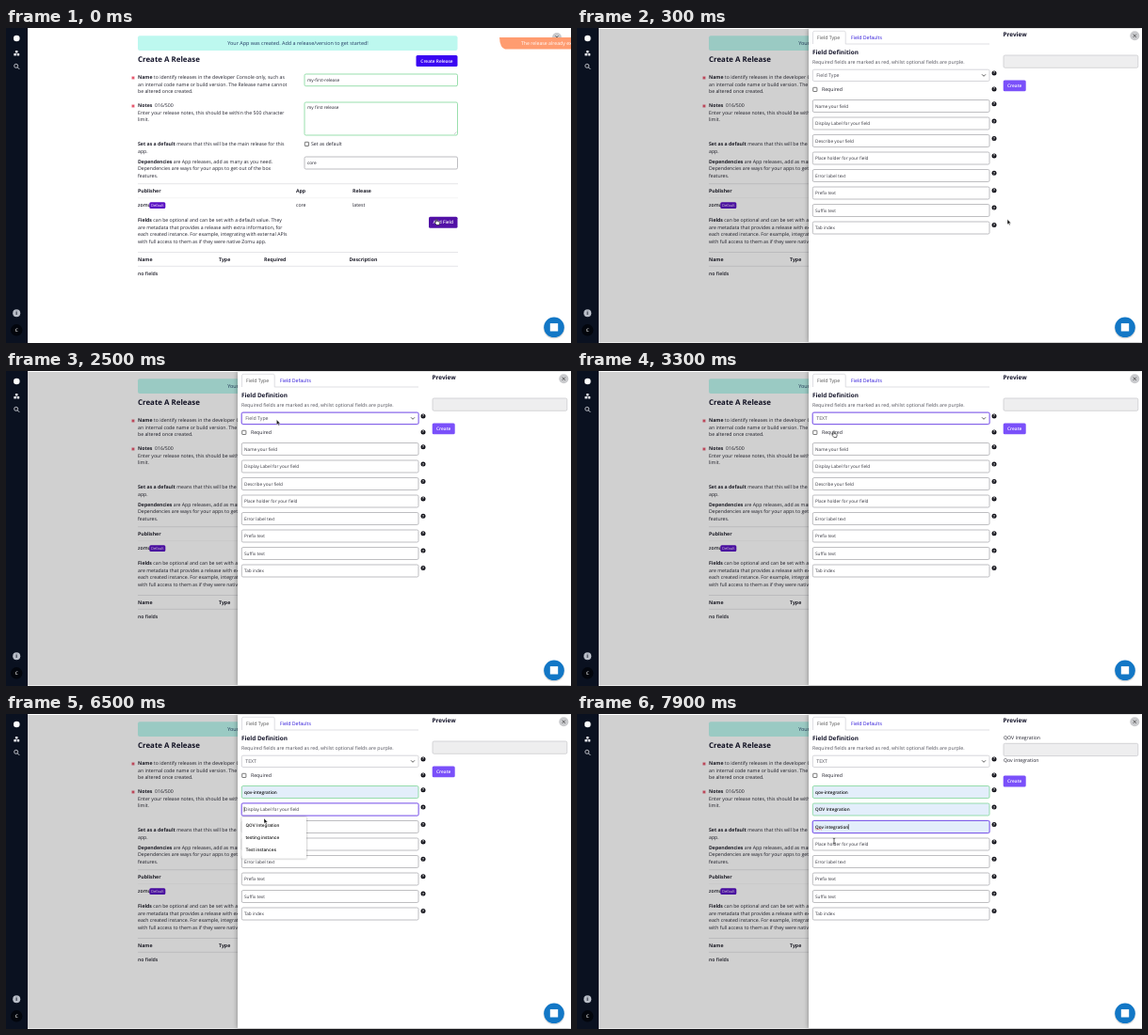
Write an HTML page that moves like this. It is 600x335 px and loops after 8 s.

```html
<!DOCTYPE html>
<html lang="en">
<head>
<meta charset="utf-8">
<title>Create a release</title>
<style>
html, body { margin: 0; width: 100%; height: 100%; overflow: hidden; background: #fff; }
svg { display: block; width: 600px; height: 335px; }
text { font-family: "Open Sans", "Noto Sans", sans-serif; text-rendering: geometricPrecision; white-space: pre; }
.b { font-weight: 700; }
.s { font-weight: 600; }
.menu { font-family: Inter, "Liberation Sans", sans-serif; font-weight: 500; }
</style>
</head>
<body>
<svg id="stage" viewBox="0 0 600 335">
  <g id="page"></g>
  <g id="live"></g>
  <g id="chrome"></g>
</svg>
<script>
const LOOP = 8000, STEP = 100;
const INK = '#20202c', PURPLE = '#5a2be2', GREEN = '#6fd28a', GREY = '#a2a2a6';
const $ = id => document.getElementById(id);

// y is the middle of the capitals
const text = (x, y, s, size = 5.2, fill = INK, cls = '', anchor = 'start') =>
  `<text x="${x}" y="${y + size * .355}" font-size="${size}" fill="${fill}" class="${cls}" text-anchor="${anchor}">${s}</text>`;
const bold = s => `<tspan class="b">${s}</tspan>`;
const lines = (x, y, rows) => rows.map((s, i) => text(x, y + i * 7.5, s)).join('');
const rect = (x, y, w, h, fill, stroke = 'none', r = 1.5, sw = .7) =>
  `<rect x="${x}" y="${y}" width="${w}" height="${h}" rx="${r}" fill="${fill}" stroke="${stroke}" stroke-width="${sw}"/>`;
const circle = (x, y, r, fill) => `<circle cx="${x}" cy="${y}" r="${r}" fill="${fill}"/>`;
const path = (d, stroke, sw = .6, fill = 'none') =>
  `<path d="${d}" fill="${fill}" stroke="${stroke}" stroke-width="${sw}"/>`;
const rule = (y, c = '#d4d4d8') => path(`M140 ${y}H480`, c, .6);
const button = (x, y, w, s, fill, h = 12) =>
  rect(x, y, w, h, fill) + text(x + w / 2, y + h / 2, s, 4.8, '#fff', 's', 'middle');
const star = (x, y) => path(`M${x} ${y - 1.8}v3.6M${x - 1.6} ${y - .9}l3.2 1.8M${x - 1.6} ${y + .9}l3.2 -1.8`, '#e2405a', .9);
const closer = (x, y) => circle(x, y, 5, '#c9cacd') +
  path(`M${x - 1.6} ${y - 1.6}l3.2 3.2m0 -3.2l-3.2 3.2`, '#333', .7);

function page() {
  const heads = (y, cols) => cols.map(([x, s]) => text(x, y, s, 5.2, INK, 'b')).join('');
  return rect(140, 8.3, 339.5, 15.7, '#bdf8ef', 'none', 2) +
    text(310, 16.2, 'Your App was created. Add a release/version to get started!', 5.44, '#223a63', '', 'middle') +
    text(140, 33.3, 'Create A Release', 7.9, '#14142a', 'b') +
    button(435.5, 29, 44, 'Create Release', '#3a06f2') +
    star(135, 53) + star(135, 83) +
    lines(140, 52.5, [bold('Name') + ' to identify releases in the developer Console only, such as',
      'an internal code name or build version. The Release name cannot', 'be altered once created.']) +
    lines(140, 82.5, [bold('Notes') + '  016/500',
      'Enter your release notes, this should be within the 500 character', 'limit.']) +
    lines(140, 123.5, [bold('Set as a default') + ' means that this will be the main release for this', 'app.']) +
    lines(140, 142, [bold('Dependencies') + ' are App releases, add as many as you need.',
      'Dependencies are ways for your apps to get out of the box', 'features.']) +
    rect(317, 49, 162.5, 12.7, '#fff', GREEN) + text(320, 55.3, 'my-first-release', 4.7) +
    rect(317, 79, 162.5, 35, '#fff', GREEN) + text(320, 84.6, 'my first release', 4.7) +
    path('M476 113l2.5 -2.5', GREY, .5) +
    rect(317.3, 121.3, 4.2, 4.2, '#fff', '#444', .5) + text(324, 123.5, 'Set as default') +
    rect(317, 137, 162.5, 13, '#fff', GREY) + text(320, 143.5, 'core', 4.7) +
    rule(165.7) + heads(173.5, [[140, 'Publisher'], [308, 'App'], [368, 'Release']]) + rule(180.7, '#eee') +
    text(140, 188.5, 'zomu', 5.2, INK, 's') +
    rect(152.3, 185.3, 17, 6.6, '#5a10c4', 'none', 1.5) + text(160.8, 188.6, 'Default', 4, '#fff', '', 'middle') +
    text(308, 188.5, 'core') + text(368, 188.5, 'latest') +
    lines(140, 204.5, [bold('Fields') + ' can be optional and can be set with a default value. They',
      'are metadata that provides a release with extra information, for',
      'each created instance. For example, integrating with external APIs',
      'with full access to them as if they were native Zomu app.']) +
    button(449, 200.7, 30.5, 'Add Field', '#5210a6') +
    rule(238.5) +
    heads(246, [[140, 'Name'], [226, 'Type'], [274, 'Required'], [364.5, 'Description']]) +
    rule(253.3) + text(140, 261, 'no fields', 5.2, INK, 's') +
    closer(585, 10) + text(586, 20, 'ESC', 4.6, '#777', '', 'middle');
}

function chrome() {
  return rect(0, 0, 23, 335, '#0a1120', 'none', 0) +
    circle(11.3, 11, 3.3, '#fff') +
    rect(9.9, 24, 2.6, 2.4, '#e6e8ee', 'none', .3) + rect(8.3, 27, 2.6, 2.4, '#e6e8ee', 'none', .3) +
    rect(11.6, 27, 2.6, 2.4, '#e6e8ee', 'none', .3) +
    `<circle cx="10.7" cy="40.3" r="2" fill="none" stroke="#e6e8ee" stroke-width=".8"/>` +
    path('M12.2 41.8l2 2', '#e6e8ee', .9) +
    circle(11.2, 303.3, 4, '#b9bec8') + text(11.2, 303.3, 'i', 5.6, '#0a1120', 'b', 'middle') +
    circle(11.2, 321.3, 6.2, '#03060d') + text(11.2, 321.3, 'C', 4.8, '#fff', 's', 'middle') +
    circle(582, 319.2, 11.3, '#0002') + circle(582, 318.3, 10.8, '#1277c6') +
    rect(577.8, 314.1, 8.4, 8.4, '#fff', 'none', 0);
}

// Inputs of the panel; the first three are clicked, then filled from a menu
const fields = [
  { hint: 'Name your field', click: 4300, pick: 5400, menu: ['qov-integration', 'testing-instances', 'test-instnces'] },
  { hint: 'Display Label for your field', click: 6100, pick: 6900, menu: ['QOV Integration', 'testing instance', 'Test instances'] },
  { hint: 'Describe your field', click: 7100, pick: 7600, menu: ['Qov integration'] },
  ...['Place holder for your field', 'Error label text', 'Prefix text', 'Suffix text', 'Tab index'].map(hint => ({ hint }))
];
const fieldY = i => 83 + 18.5 * i;
const SELECT_FOCUS = 2000, SELECT_PICK = 2700;

const glow = (x, y, w, h) => rect(x, y, w, h, 'none', '#5a2be240', 2, 2);

function field(f, i, t) {
  const y = fieldY(i), top = y - 6.5;
  const next = fields[i + 1].click || LOOP;
  const filled = t >= f.pick, focused = t >= f.click && t < next;
  const since = t - (filled ? f.pick : f.click);
  const caret = focused && since % 1000 < 500;
  return (focused ? glow(250.3, top, 187.7, 13) : '') +
    rect(250.3, top, 187.7, 13, filled ? '#e3eefb' : '#fff', focused ? PURPLE : filled ? GREEN : GREY) +
    text(253, y, filled ? f.menu[0] : f.hint, 4.7, filled ? '#111' : '#33333c', filled ? 's' : '') +
    (filled && i == 2 ? path('M253 122.6q.6 -.8 1.2 0t1.2 0 1.2 0 1.2 0 1.2 0 1.2 0', '#e33', .5) : '') +
    (caret ? path(`M${filled ? 288.3 : 253} ${y - 2.8}v5.6`, '#111', .6) : '');
}

function menu(f, i, t) {
  if (!(t >= f.click && t < f.pick)) return '';
  const y = fieldY(i) + 8, h = 5.5 + 12.9 * f.menu.length;
  return `<g style="filter:drop-shadow(0 .6px 1.2px #0006)">${rect(250.3, y, 68.7, h, '#fff', 'none', 1)}</g>` +
    f.menu.map((s, k) => text(254.5, y + 9.2 + 12.9 * k, s, 4.7, '#111', 'menu')).join('');
}

function panel(t) {
  const chosen = t >= SELECT_PICK, selFocus = t >= SELECT_FOCUS && t < fields[0].click;
  const label = t >= fields[1].pick, note = t >= fields[2].pick;
  const helpY = [48, 65, ...fields.map((f, i) => 80.7 + 18.4 * i)];
  const boxY = label ? 31.3 : 29;
  return `<g style="filter:drop-shadow(-1px 0 2px #0004)">${rect(246, 1, 354, 333, '#fff', 'none', 0)}</g>` +
    path('M250.5 17V5q0 -1.7 1.7 -1.7H283.5q1.7 0 1.7 1.7V17H438', '#c9c9d0', .6) +
    text(255, 10.3, 'Field Type', 5.2, '#555') + text(291, 10.3, 'Field Defaults', 5.2, '#2a12d8') +
    text(250, 25.3, 'Field Definition', 6.4, '#14142a', 'b') +
    text(250, 36, 'Required fields are marked as red, whilst optional fields are purple.', 5.2, '#50505a') +
    (selFocus ? glow(250.3, 44.2, 187.7, 12.3) : '') +
    rect(250.3, 44.2, 187.7, 12.3, '#fff', selFocus ? PURPLE : '#c4c4ca') +
    text(254.3, 50.4, chosen ? 'TEXT' : 'Field Type', 5.2, '#50505a') +
    path('M430 49.3l2 2 2 -2', '#333', .8) +
    rect(250.7, 63.3, 4.2, 4.2, '#fff', '#444', .5) + text(260, 65.5, 'Required') +
    fields.map((f, i) => i < 7 ? field(f, i, t) : rect(250.3, fieldY(i) - 6.5, 187.7, 13, '#fff', GREY) +
      text(253, fieldY(i), f.hint, 4.7, '#33333c')).join('') +
    helpY.map(y => circle(443, y, 2.5, '#15151c') + text(443, y, '?', 4, '#fff', 'b', 'middle')).join('') +
    text(452.5, 7, 'Preview', 6.4, '#14142a', 'b') +
    (label ? text(453, 25.3, fields[1].menu[0]) : '') +
    rect(453, boxY, 142.8, 13.3, '#eeeeef', '#c6c6ca') +
    (note ? text(453, 49, fields[2].menu[0]) : '') +
    button(452.7, note ? 65.6 : label ? 57.5 : 55.5, 24, 'Create', '#7a50fa', 11.8) +
    closer(592.3, 8.3) +
    fields.map((f, i) => menu(f, i, t)).join('');
}

// time, x, y of the pointer
const track = [
  [0, 457, 203.5], [400, 457, 203.5], [1100, 335, 92], [1500, 309.5, 64], [1900, 300, 51], [2700, 285, 52],
  [3300, 272.5, 64.5], [3700, 274, 78], [4300, 276, 82], [4800, 276, 82], [5300, 275, 99], [5600, 275, 100],
  [6000, 274.5, 101], [6300, 274, 107], [6500, 274, 111], [6800, 274, 118], [7100, 274, 120], [7200, 274, 121],
  [7600, 273, 136], [7900, 273, 135]
];
function pointer(t) {
  const k = Math.max(1, track.findIndex(p => p[0] >= t));
  const [a, b] = [track[k - 1], track[k]];
  const u = (t - a[0]) / (b[0] - a[0]), e = u * u * (3 - 2 * u);
  const x = a[1] + (b[1] - a[1]) * e, y = a[2] + (b[2] - a[2]) * e;
  const listed = fields.some((f, i) => t >= f.click && t < f.pick && y > fieldY(i) + 8);
  const inField = t >= STEP && x < 438 && !listed && fields.some((f, i) => Math.abs(y - fieldY(i)) < 6.5);
  const onLink = t < STEP || (x < 283 && Math.abs(y - 65) < 3.5);
  const shape = inField
    ? path('M-1.2 -2.8q1.2 0 1.2 .8q0 -.8 1.2 -.8M0 -2V2M-1.2 2.8q1.2 0 1.2 -.8q0 .8 1.2 .8', '#111', .6)
    : onLink
      ? path('M-.6 0q.6 -.7 1.2 0V2l2.6 .6q.7 .3 .5 1L3.1 6H.3L-1.8 3.4q0 -.8 .7 -.6l.5 .5Z', '#111', .6, '#fff')
      : path('M0 0V5.4L1.3 4.2 2.2 6.2 3.1 5.8 2.2 3.9H3.9Z', '#fff', .4, '#111');
  return `<g transform="translate(${x} ${y})">${shape}</g>`;
}

function live(t) {
  if (t < STEP) {
    return `<path d="M524 10H600V22.5H530Q524.5 21 524 10Z" fill="#ff9c70"/>` +
      text(547, 16.3, 'The release already exists', 5.2, '#fff') + pointer(t);
  }
  const left = Math.max(0, 1 - (t - 100) / 200);
  const shown = 1 - .55 * left;
  return rect(23, 1, 577, 333.5, '#0000002f', 'none', 0) +
    `<g opacity="${shown}" transform="translate(${68 * left * left} 0)">${panel(t)}</g>` + pointer(t);
}

$('page').innerHTML = page();
$('chrome').innerHTML = chrome();
let last = -1;
function tick(now) {
  const t = Math.floor(now % LOOP / STEP) * STEP;
  if (t !== last) $('live').innerHTML = live(last = t);
  requestAnimationFrame(tick);
}
tick(performance.now());
</script>
</body>
</html>
```
